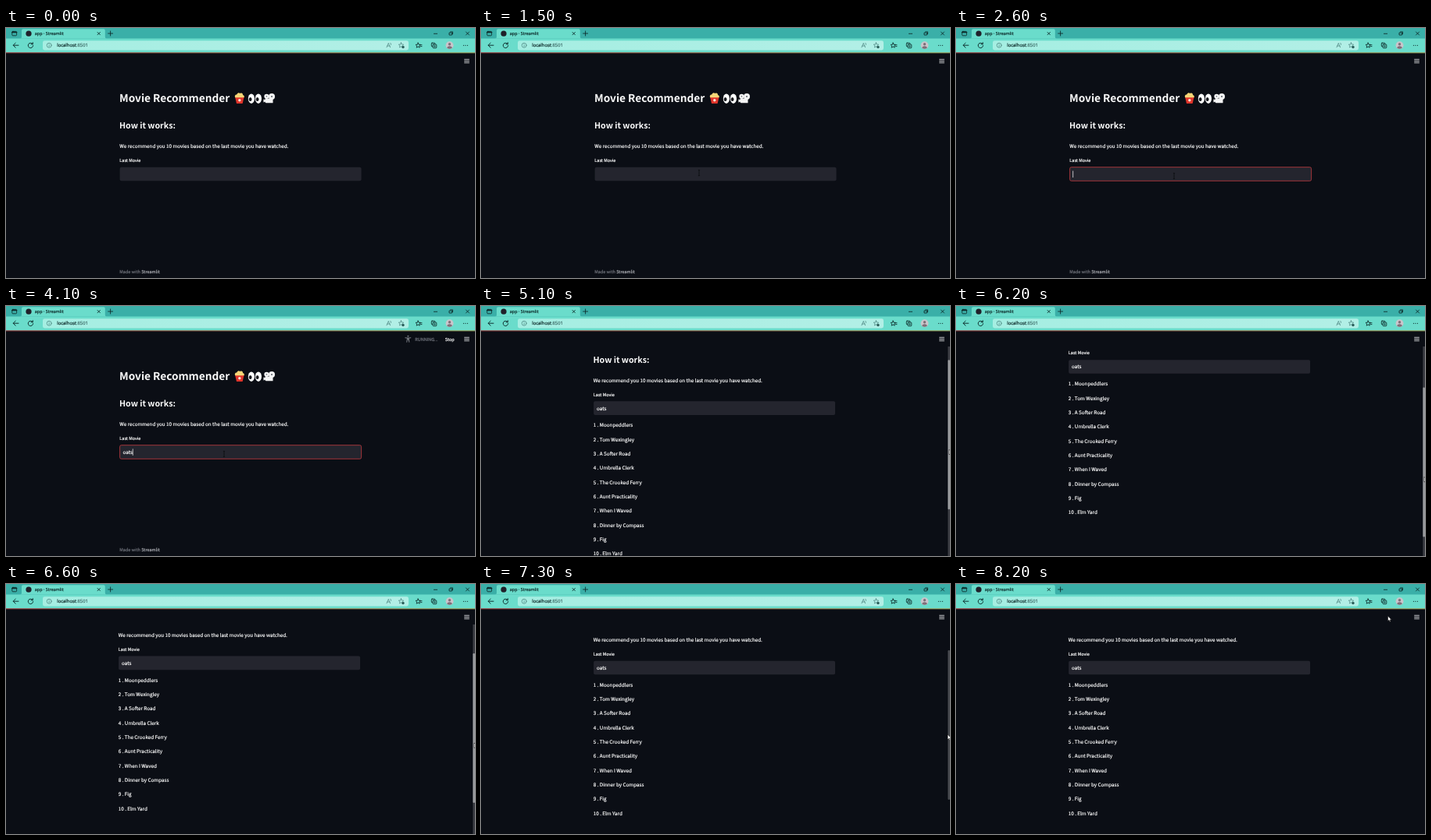
Write an HTML page that moves like this. It is 600 px wide and 321 px high and loops after 8300 ms.

```html
<!DOCTYPE html>
<html lang="en">
<head>
<meta charset="utf-8">
<title>app</title>
<style>
  html, body { margin: 0; width: 100%; height: 100%; overflow: hidden; background: #0b0e15; }
  svg { display: block; width: 100vw; height: 100vh; }
  text { text-rendering: geometricPrecision; white-space: pre; }
  text, tspan { fill: currentColor; stroke: currentColor; stroke-width: .2; }
  .page { font: 6.31px "Noto Sans CJK JP", "Noto Sans CJK SC", "Noto Sans", sans-serif; color: #fafafa; fill: #fafafa; }
  .page .small { font-size: 5.52px; }
  .page .h1 { font-size: 13.65px; font-weight: 700; stroke: none; }
  .page .h2 { font-size: 10.65px; font-weight: 700; stroke: none; }
  .ui { font: 5.7px "Open Sans", "Noto Sans", sans-serif; color: #0c2a29; }
  .line { fill: none; stroke: #0c2a29; stroke-width: .85; stroke-linecap: round; stroke-linejoin: round; }
</style>
</head>
<body>
<svg viewBox="0 0 600 321" preserveAspectRatio="none">
  <defs>
    <linearGradient id="deco">
      <stop offset="0" stop-color="#ff4b4b"/><stop offset="1" stop-color="#fffd80"/>
    </linearGradient>
    <linearGradient id="bar">
      <stop offset="0" stop-color="#a5eee2"/><stop offset="1" stop-color="#b2efe6"/>
    </linearGradient>
    <path id="star" d="M0-3.2 .9-1 3.2-.8 1.5.8 2 3 0 1.8-2 3-1.5.8-3.2-.8-.9-1Z"/>
  </defs>

  <rect width="600" height="321" fill="#0b0e15"/>

  <g class="page">
    <g id="content">
      <text class="h1" x="145" y="95.3">Movie Recommender</text>

      <g id="popcorn">
        <path d="M293 88.5H304.6L302.6 97H295Z" fill="#e0352b"/>
        <path d="M293.2 89.2C292 86.5 294 85.3 295.3 85.6 295.5 83.2 298.2 82.4 299.4 84 301.5 82.8 303.4 84.4 302.9 86 305 86.4 305.2 88.4 304.4 89.2Z" fill="#f6d878"/>
        <circle cx="298.8" cy="92.7" r="1.7" fill="#fbe6d8"/>
      </g>
      <g id="eyes">
        <ellipse cx="313.9" cy="90.7" rx="4.1" ry="6.2" fill="#fff"/>
        <ellipse cx="322.9" cy="90.7" rx="4.1" ry="6.2" fill="#fff"/>
        <ellipse cx="312.6" cy="91.5" rx="1.9" ry="2.6" fill="#14161c"/>
        <ellipse cx="321.6" cy="91.5" rx="1.9" ry="2.6" fill="#14161c"/>
      </g>
      <g id="projector" fill="#f4f4f4">
        <circle cx="333.4" cy="87.8" r="3.1"/>
        <circle cx="340" cy="88" r="4"/>
        <path d="M331.5 90.5H341.5V96.2H333Q331.5 96.2 331.5 94.7ZM329.4 91.4 332 92.3V94.6L329.4 95.4Z"/>
        <circle cx="333.4" cy="87.8" r=".8" fill="#555a63"/>
        <circle cx="340" cy="88" r="1" fill="#555a63"/>
      </g>

      <text class="h2" x="145" y="129">How it works:</text>
      <text x="145.3" y="154.3">We recommend you 10 movies based on the last movie you have watched.</text>
      <text class="small" x="145.3" y="172">Last Movie</text>
      <rect id="field" x="145.6" y="178.7" width="309" height="17.6" rx="2" fill="#24252e" stroke-width=".8"/>
      <text id="typed" x="149.5" y="190"></text>
      <rect id="caret" y="183.4" width=".7" height="8.6"/>
      <g id="results"></g>
      <text id="footer" class="small" x="145.3" y="315" color="#6d7078">Made with <tspan color="#a6a8ae">Streamlit</tspan></text>
    </g>

    <g id="scrollbar">
      <rect id="track" x="597.3" y="32" width="2.7" height="289" fill-opacity=".2"/>
      <rect id="thumb" x="597.3" width="2.7" height="192" rx="1.2"/>
    </g>

    <rect y="31" width="600" height="21" fill="#0b0e15"/>
    <g id="running">
      <g fill="none" stroke="#7c7f87" stroke-width="1" stroke-linecap="round">
        <circle cx="514.3" cy="38.7" r=".7" fill="#7c7f87" stroke-width=".5"/>
        <path d="M510.8 40.8 514.3 41.2 517.8 40.8M514.3 41.2V43.6M513.5 41.3 512.8 46.3M515.1 41.3 515.8 46.3"/>
      </g>
      <text class="small" x="523.2" y="44.5" color="#73767f">RUNNING...</text>
      <text class="small" x="561.8" y="44.5">Stop</text>
    </g>
    <path d="M586.2 40.3H592.8M586.2 42.5H592.8M586.2 44.7H592.8" stroke="#e6e7e9" stroke-width=".9"/>
  </g>

  <g class="ui">
    <rect width="600" height="14" fill="#3aafa8"/>
    <rect y="13.5" width="600" height="18" fill="#6adccb"/>
    <path d="M18 13.6Q20 13.6 20 11.6V3.2Q20 1.2 22 1.2H124.8Q126.8 1.2 126.8 3.2V11.6Q126.8 13.6 128.8 13.6Z" fill="#6adccb"/>
    <rect y="31.4" width="600" height=".9" fill="url(#deco)" opacity=".7"/>
    <rect x="47" y="16.3" width="468" height="12.2" rx="2.4" fill="url(#bar)"/>

    <g class="line">
      <rect x="7.8" y="4.4" width="5.8" height="5.4" rx="1"/>
      <path d="M7.8 5.5H13.6" stroke-width="1.5"/>
      <path d="M117 5.4 120.4 8.8M120.4 5.4 117 8.8"/>
      <path d="M130.6 7H136.6M133.6 4V10"/>
      <path d="M547.4 7.3H551.6"/>
      <path d="M567.4 6H570.4V9H567.4ZM568.6 4.9H571.5V7.8"/>
      <path d="M588.5 5 592.5 9M592.5 5 588.5 9"/>
      <path d="M16 22.2H9.2M12.2 19.2 9.2 22.2 12.2 25.2" stroke-width=".95"/>
      <path d="M34 20.4A3.2 3.2 0 1 0 34.7 22.6M34.3 18.7V20.8H32.2" stroke-width=".95"/>
      <g stroke="#3f7873" stroke-width=".65">
        <circle cx="55.2" cy="22.2" r="3"/>
        <path d="M55.2 22V23.8M55.2 20.6V20.7"/>
        <path d="M487 24.8 489.3 19.4 491.6 24.8M487.8 23H490.8M491.8 19.2Q492.9 20 492.6 21.4"/>
        <use href="#star" x="505.5" y="22"/>
      </g>
      <circle cx="508" cy="24.5" r="1.7" fill="#2a5f5b" stroke="none"/>
      <use href="#star" x="527.2" y="22.2"/>
      <path d="M529.5 21.7H532M530.2 23.6H532"/>
      <rect x="544.3" y="19.2" width="4.6" height="4.6" rx=".8"/>
      <rect x="546.1" y="21" width="4.7" height="4.7" rx=".8" fill="#6adccb"/>
      <path d="M548.45 22.2V24.5M547.3 23.35H549.6" stroke-width=".6"/>
    </g>
    <circle cx="29" cy="7.2" r="3.6" fill="#20202a"/>
    <circle cx="567.5" cy="22.2" r="4.9" fill="#c9c5cb"/>
    <circle cx="567.5" cy="20.8" r="1.7" fill="#7d6f78"/>
    <path d="M564.3 25.7Q564.3 23.2 567.5 23.2T570.7 25.7Q567.5 27.6 564.3 25.7Z" fill="#7d6f78"/>
    <g fill="#0c2a29">
      <circle cx="585.4" cy="22.3" r=".6"/><circle cx="587.9" cy="22.3" r=".6"/><circle cx="590.4" cy="22.3" r=".6"/>
    </g>
    <text x="36.8" y="9.2" font-size="5.45">app · Streamlit</text>
    <text x="65.2" y="24.3" font-size="5.9">localhost<tspan color="#416f6b">:8501</tspan></text>
  </g>

  <path id="arrow" d="M0 0V6.6L1.5 5.3 2.5 7.5 3.6 7 2.6 4.9H4.7Z" fill="#fff" stroke="#111" stroke-width=".6"/>
  <path id="ibeam" d="M-1.1-3.6H-.3L0-3.3.3-3.6H1.1M0-3.3V3.3M-1.1 3.6H-.3L0 3.3.3 3.6H1.1" fill="none" stroke="#050608" stroke-width=".7"/>
</svg>
<script>
  const LOOP = 8300, STEP = 100;
  const FOCUS = 2200, ENTER = 3800, DONE = 4300, GRAB = 4900, RELEASE = 7200;
  const TOP = 32, THUMB_RANGE = 97, SCROLL_RANGE = 146.5, GRAB_Y = 147;
  const QUERY = 'oats', KEYS = [2900, 3150, 3400, 3600];
  const TITLES = ['Moonpeddlers', 'Tom Wexingley', 'A Softer Road', 'Umbrella Clerk', 'The Crooked Ferry',
    'Aunt Practicality', 'When I Waved', 'Dinner by Compass', 'Fig', 'Elm Yard'];

  // time, x, y of the pointer
  const PATH = [
    [0, 300, 330], [100, 300, 330], [800, 279, 186], [1800, 279, 186], [2100, 279, 190],
    [4400, 279, 190], [4900, 599, 147], [5400, 599, 253], [5700, 599, 253],
    [6500, 599, 204], [6700, 599, 204], [7000, 599, 200], [7200, 599, 200],
    [8000, 552.5, 41], [LOOP, 552.5, 41]
  ];

  const $ = id => document.getElementById(id);
  const show = (id, on) => $(id).setAttribute('visibility', on ? 'visible' : 'hidden');
  const move = (id, x, y) => $(id).setAttribute('transform', `translate(${x} ${y})`);
  const clamp = (v, lo, hi) => Math.min(hi, Math.max(lo, v));

  TITLES.forEach((title, i) => {
    const row = document.createElementNS('http://www.w3.org/2000/svg', 'text');
    row.setAttribute('x', 145.3);
    row.setAttribute('y', 211.8 + i * 18.33);
    row.textContent = `${i + 1} . ${title}`;
    $('results').append(row);
  });

  function pointer(t) {
    const i = PATH.findIndex(p => p[0] > t);
    const [t0, x0, y0] = PATH[i - 1], [t1, x1, y1] = PATH[i];
    const u = (t - t0) / (t1 - t0), e = u * u * (3 - 2 * u);
    return [x0 + (x1 - x0) * e, y0 + (y1 - y0) * e];
  }

  function draw(t) {
    const [x, y] = pointer(t);
    const done = t >= DONE, dragging = t >= GRAB && t < RELEASE;
    const focused = t >= FOCUS && t < GRAB;

    const gripY = pointer(Math.min(t, RELEASE))[1];
    const offset = t < GRAB ? 0 : clamp(gripY - GRAB_Y, 0, THUMB_RANGE);
    move('content', done ? -1.5 : 0, -offset * SCROLL_RANGE / THUMB_RANGE);
    move('footer', 0, done ? SCROLL_RANGE : 0);
    show('results', done);
    show('running', t >= ENTER && t < DONE);

    const typed = KEYS.filter(k => k <= t).length;
    $('typed').textContent = QUERY.slice(0, typed);
    $('field').setAttribute('stroke', focused ? '#c23b40' : 'none');
    const last = Math.max(...[FOCUS, ...KEYS, ENTER].filter(k => k <= t));
    show('caret', focused && (t - last) % 1000 < 500);
    $('caret').setAttribute('x', 149.4 + (typed ? $('typed').getComputedTextLength() : 0));

    show('scrollbar', done && y > 52);
    show('track', done && dragging);
    $('thumb').setAttribute('y', TOP + offset);
    $('thumb').setAttribute('fill-opacity', dragging ? .5 : .25);

    const overField = t < GRAB && x > 145 && x < 455 && y > 178 && y < 197;
    show('ibeam', overField);
    show('arrow', !overField);
    move('ibeam', x, y);
    move('arrow', x, y);
  }

  function tick() {
    draw(Math.floor(performance.now() % LOOP / STEP) * STEP);
    requestAnimationFrame(tick);
  }
  tick();
</script>
</body>
</html>
```
